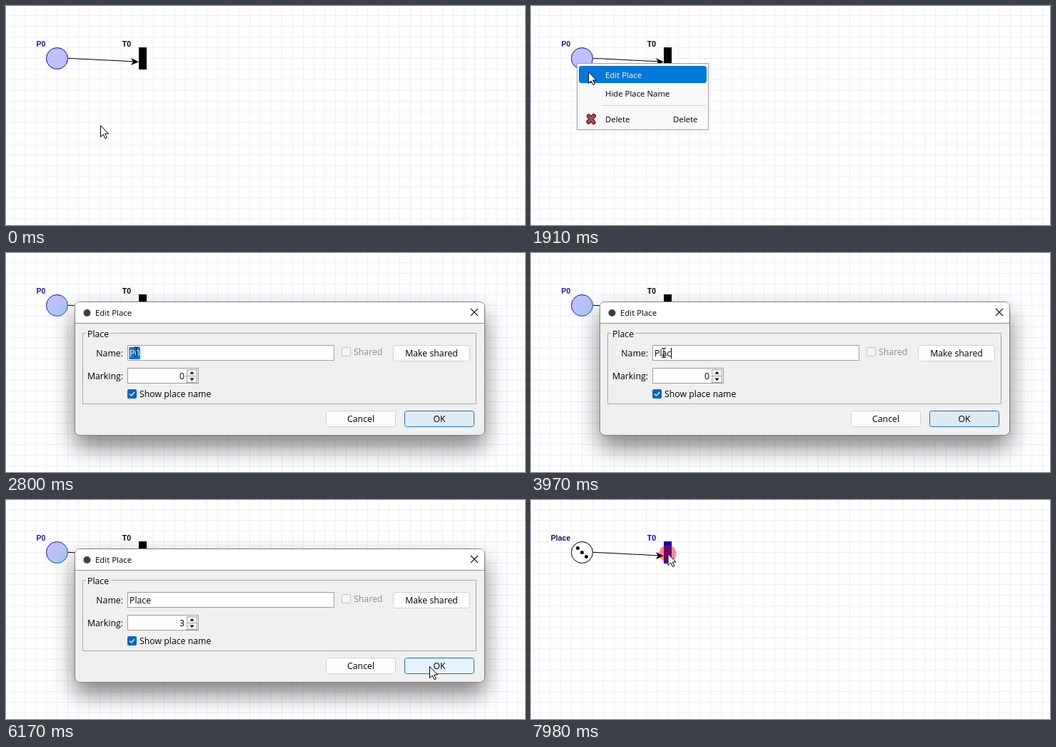
These frames come from a looping animation (727 by 307 pixels, 8000 ms). An HTML page:

```html
<!DOCTYPE html>
<html lang="en">
<head>
<meta charset="utf-8">
<title>Edit a place</title>
<style>
  html, body { margin: 0; width: 100%; height: 100%; overflow: hidden; background: #fff; }
  svg { display: block; }
  text { font: 12.3px "Open Sans", "Noto Sans", sans-serif; }
  .label { font: bold 10.5px "Liberation Sans", Arial, sans-serif; text-anchor: end; }
  .small { font-size: 11.4px; }
  .mid { text-anchor: middle; }
  .end { text-anchor: end; }
  .field { fill: #fff; stroke: #9c9c9c; }
  .button { fill: #fdfdfd; stroke: #d0d0d0; }
  .spin { fill: #f0f0f0; stroke: #a8a8a8; }
  #window { filter: drop-shadow(0 16px 16px rgba(0, 0, 0, .5)); }
</style>
</head>
<body>
<svg width="727" height="307" viewBox="0 0 727 307">
  <defs>
    <pattern id="grid" x="11" y="13" width="15" height="15" patternUnits="userSpaceOnUse">
      <path d="M.5 0V15M0 .5H15" stroke="#eeeeff"/>
    </pattern>
    <linearGradient id="tint" x2="1" y2="1">
      <stop offset=".2" stop-color="#c2c0ff"/><stop offset="1" stop-color="#a6ccf4"/>
    </linearGradient>
    <linearGradient id="tintEdge" x2="1" y2="1">
      <stop offset=".3" stop-color="#1818a0"/><stop offset=".9" stop-color="#0068c4"/>
    </linearGradient>
  </defs>
  <rect width="727" height="307" fill="url(#grid)"/>

  <text id="placeLabel" class="label" x="55.3" y="57"></text>
  <text id="barLabel" class="label" x="175" y="57">T0</text>
  <circle id="place" cx="71.5" cy="73.5" r="15"/>
  <g id="tokens"></g>
  <rect id="bar" x="186" y="58" width="11" height="31"/>
  <path d="M87 73.3L178 77.8" stroke="#000" fill="none"/>
  <path d="M186 78.3L175 73L178 78L175 83Z"/>

  <g id="menu">
    <rect x="64.5" y="80.5" width="184" height="93" fill="#f9f9f9" stroke="#a0a0a0"/>
    <rect id="highlight" x="67" y="84" width="179" height="24" rx="4" fill="#0078d7"/>
    <text id="editItem" class="small" x="104" y="101">Edit Place</text>
    <text class="small" x="104" y="127">Hide Place Name</text>
    <path d="M99 139.5H245" stroke="#d4d4d4"/>
    <g stroke-linecap="round">
      <path d="M81 154.5L87.5 163M88 154L80.5 162.5" stroke="#301018" stroke-width="6"/>
      <path d="M81 154.5L87.5 163M88 154L80.5 162.5" stroke="#bd4653" stroke-width="4"/>
    </g>
    <text class="small" x="104" y="163">Delete</text>
    <text class="small" x="199" y="163">Delete</text>
  </g>

  <g id="dialog">
    <rect id="window" x="96.5" y="68.5" width="574" height="187" rx="7" fill="#f0f0f0" stroke="#808080"/>
    <path d="M97 99V76Q97 69 104 69H663Q670 69 670 76V99Z" fill="#fff"/>
    <path d="M97 98.5H670" stroke="#8a8a8a"/>
    <circle cx="113.5" cy="84" r="5" fill="#4a3b36"/>
    <text class="small" x="125" y="88">Edit Place</text>
    <path d="M651 78L661 88M661 78L651 88" stroke="#111" stroke-width="1.1"/>

    <path d="M112 112.5H107.5V211.5H658.5V112.5H146" fill="none" stroke="#a8a8a8"/>
    <text x="114" y="118">Place</text>
    <text class="end" x="164" y="145">Name:</text>
    <rect class="field" x="170.5" y="129.5" width="289" height="21"/>
    <rect id="selection" x="172.5" y="132" width="15.5" height="17" fill="#0078d7"/>
    <text id="name" x="173" y="145"></text>
    <path id="caret" stroke="#000"/>
    <rect x="470.5" y="132.5" width="12" height="12" rx="1.5" fill="#f6f6f6" stroke="#c4c4c4"/>
    <text x="487" y="143" fill="#8c8c8c">Shared</text>
    <rect class="button" x="542.5" y="129.5" width="107" height="22" rx="3"/>
    <text class="mid" x="596" y="145">Make shared</text>

    <text class="end" x="164" y="177">Marking:</text>
    <rect class="field" x="170.5" y="161.5" width="99" height="21"/>
    <text id="marking" class="end" x="250" y="177"></text>
    <rect class="spin" x="253.5" y="163.5" width="14" height="9"/>
    <rect class="spin" x="253.5" y="172.5" width="14" height="9"/>
    <path d="M257.5 169.5L260.5 166L263.5 169.5ZM257.5 175.5L260.5 179L263.5 175.5Z"/>

    <rect x="170" y="191" width="13" height="13" rx="2" fill="#0067c0"/>
    <path d="M173 197.5L175.7 200L180 195" fill="none" stroke="#fff" stroke-width="1.2"/>
    <text x="187" y="202">Show place name</text>

    <rect class="button" x="448.5" y="221.5" width="97" height="22" rx="3"/>
    <text class="mid" x="497" y="237">Cancel</text>
    <rect id="ok" x="558.5" y="221.5" width="97" height="22" rx="3" stroke="#1a73b8"/>
    <text class="mid" x="607" y="237">OK</text>
  </g>

  <g id="pointer">
    <circle id="press" r="12" fill="red" fill-opacity=".45"/>
    <path id="arrow" d="M.5 .5V16.5L4.2 13L7 18.7L9.4 17.6L6.7 12H11.5Z" fill="#fff" stroke="#000"/>
    <path id="beam" d="M-3 -6.5H-1L0 -6L1 -6.5H3M0 -6V6M-3 6.5H-1L0 6L1 6.5H3" fill="none" stroke="#000"/>
  </g>
</svg>
<script>
const LOOP = 8000, PRESS = 75, KEY_GAP = 175, SPIN_GAP = 210;
const at = {
  pick: 820, menu: 1490, hover: 1780, edit: 2050, open: 2190, toName: 2310, type: 3430,
  toSpinner: 4250, spin: 4860, toOk: 5480, ok: 6240, leave: 6380, toBar: 7560, fire: 7980
};
const glides = [
  { start: 200, span: 350, to: [64, 80] },
  { start: at.hover, span: 130, to: [80, 92] },
  { start: at.toName, span: 600, to: [186, 140] },
  { start: at.toSpinner, span: 500, to: [259, 167] },
  { start: at.toOk, span: 690, to: [593, 233] },
  { start: at.leave, span: 380, to: [198, 73] },
  { start: at.toBar, span: 170, to: [191.5, 75] }
];
const presses = [at.pick, at.menu, at.edit, at.ok, at.fire];

const ui = Object.fromEntries([...document.querySelectorAll('[id]')].map(e => [e.id, e]));
const clamp = (v, low, high) => Math.min(high, Math.max(low, v));
const between = (t, from, to) => t >= from && t < to;
const show = (el, on) => el.style.display = on ? '' : 'none';
const set = (el, attrs) => { for (const k in attrs) el.setAttribute(k, attrs[k]); };
const easeOut = (t, start, span) => 1 - (1 - clamp((t - start) / span, 0, 1)) ** 2;

for (const side of [-1, 0, 1]) {
  const token = document.createElementNS('http://www.w3.org/2000/svg', 'circle');
  set(token, { cx: 71.5 + 6 * side, cy: 73.5 + 6 * side, r: 2.5 });
  ui.tokens.append(token);
}

function pointerAt(t) {
  return glides.reduce((pos, { start, span, to }) => {
    const f = easeOut(t, start, span);
    return pos.map((v, i) => v + (to[i] - v) * f);
  }, [132, 167]);
}

function drawNet(t) {
  const edited = t >= at.ok + PRESS, fired = t >= at.fire;
  const tinted = between(t, at.open, at.leave);
  ui.placeLabel.textContent = edited ? 'Place' : 'P0';
  set(ui.placeLabel, { fill: edited ? '#14146e' : '#1c1ca0' });
  set(ui.place, {
    fill: fired ? '#fff' : tinted ? 'url(#tint)' : '#c0c0ff',
    stroke: fired ? '#000' : tinted ? 'url(#tintEdge)' : '#0c0c98'
  });
  show(ui.tokens, edited);
  set(ui.tokens, { fill: fired ? '#000' : '#000080' });
  for (const part of [ui.bar, ui.barLabel]) set(part, { fill: fired ? '#0000c0' : '#000' });
}

function drawMenu(t) {
  const hovered = t >= at.hover + 60;
  show(ui.menu, between(t, at.menu + 130, at.edit + PRESS));
  show(ui.highlight, hovered);
  set(ui.editItem, { fill: hovered ? '#fff' : '#000' });
}

function drawDialog(t, x, y) {
  const shown = easeOut(t, at.open, 304) * (1 - easeOut(t, at.ok + PRESS, 130));
  const scale = .88 + .12 * shown;
  const cx = 383.5 - 57 * (1 - scale), cy = 162 - 29 * (1 - scale);
  show(ui.dialog, shown > 0);
  set(ui.dialog, {
    opacity: Math.min(1, shown * 1.5),
    transform: `translate(${cx} ${cy}) scale(${scale}) translate(-383.5 -162)`
  });

  const typed = 1 + Math.floor((t - at.type) / KEY_GAP);
  const selected = typed < 1;
  ui.name.textContent = selected ? 'P0' : 'Place'.slice(0, typed);
  set(ui.name, { fill: selected ? '#fff' : '#000' });
  show(ui.selection, selected);

  const blinkOn = typed < 5 || (t - at.type) % 1000 < 500;
  show(ui.caret, between(t, at.type, at.spin) && blinkOn);
  if (shown > 0) {
    const caretX = Math.round(173 + ui.name.getComputedTextLength()) + .5;
    set(ui.caret, { d: `M${caretX} 133V148` });
  }
  ui.marking.textContent = clamp(1 + Math.floor((t - at.spin) / SPIN_GAP), 0, 3);

  const pulse = Math.round(3 * Math.sin(t / 320));
  const hover = x > 558 && y > 221;
  set(ui.ok, { fill: hover ? '#e5f1fb' : `rgb(${222 + pulse},${234 + pulse},243)` });
}

function drawPointer(t, x, y) {
  const spinning = between(t, at.spin, at.spin + 3 * SPIN_GAP) && (t - at.spin) % SPIN_GAP < PRESS;
  const overName = between(x, 170, 460) && between(y, 129, 151);
  const overMarking = between(x, 170, 253) && between(y, 161, 183);
  const overText = between(t, at.toName, at.ok) && (overName || overMarking);
  set(ui.pointer, { transform: `translate(${x} ${y})` });
  show(ui.press, spinning || presses.some(start => between(t, start, start + PRESS)));
  show(ui.beam, overText);
  show(ui.arrow, !overText);
}

function draw(now) {
  const t = now % LOOP;
  const [x, y] = pointerAt(t);
  drawNet(t);
  drawMenu(t);
  drawDialog(t, x, y);
  drawPointer(t, x, y);
}

const begin = performance.now();
function frame() {
  draw(performance.now() - begin);
  requestAnimationFrame(frame);
}
frame();
</script>
</body>
</html>
```
